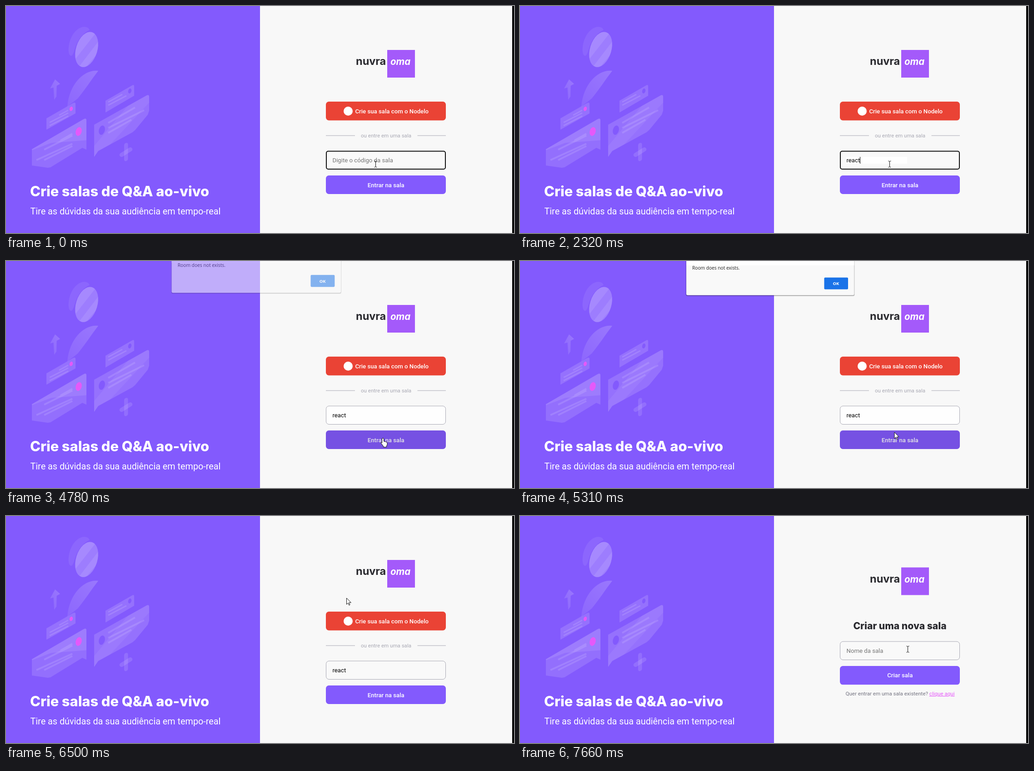
An HTML page that plays this animation: 1118x501 px, repeating every 8000 ms.

```html
<!DOCTYPE html>
<html lang="pt-BR">
<head>
<meta charset="utf-8">
<title>Salas de Q&amp;A</title>
<style>
  html, body { margin: 0; width: 100%; height: 100%; overflow: hidden; background: #f8f8f8; }
  svg { display: block; width: 100vw; height: 100vh; }
  text { font: 13.2px Roboto, sans-serif; white-space: pre; }
  .title { font: 800 30.8px Inter, sans-serif; fill: #fff; }
  .lead { font-size: 19.8px; fill: #fff; }
  .name { font: 700 23.5px Inter, sans-serif; fill: #29292e; }
  .tail { font: italic 700 20.5px Inter, sans-serif; fill: #fff; }
  .sub { font: 800 21.1px Inter, sans-serif; fill: #29292e; }
  .label { font-weight: 500; fill: #fff; }
  .small { font-size: 11.55px; fill: #a8a8b3; }
  .hint { fill: #757575; }
  .msg { font: 10.2px "Open Sans", sans-serif; fill: #222; }
  .ok { font: 700 9.5px "Open Sans", sans-serif; fill: #fff; }
  .mid { text-anchor: middle; }
  .lines { fill: none; stroke: #fff; stroke-opacity: .12; stroke-width: 4; }
</style>
</head>
<body>
<svg viewBox="0 0 1118 501" preserveAspectRatio="none">
  <defs>
    <clipPath id="oval"><ellipse cx="177.5" cy="96" rx="23.5" ry="40" transform="rotate(17 177.5 96)"/></clipPath>
    <clipPath id="cardL"><path d="M57 316 172 249q5-2 5 3v65l-9-4-70 43-6 1-35-5z"/></clipPath>
    <clipPath id="cardR"><path d="M194 262 310 197q5-2 5 3v31l-3 9-28 34-6 5-75 41-9 13z"/></clipPath>
    <linearGradient id="fade" x1="1" y1="0" x2="0" y2="1">
      <stop offset="0" stop-color="#fff" stop-opacity=".18"/>
      <stop offset="1" stop-color="#fff" stop-opacity=".08"/>
    </linearGradient>
    <g id="logo">
      <rect x="839" y="97" width="61" height="61" fill="#a45afa"/>
      <text class="name" x="770" y="130">nuvra</text>
      <text class="tail" x="846" y="130">oma</text>
    </g>
  </defs>

  <rect width="1118" height="501" fill="#f8f8f8"/>
  <rect width="559" height="501" fill="#835afd"/>

  <g fill="#fff">
    <path fill-opacity=".07" d="M184 53c-3-8-16-10-27-1-14 11-21 33-19 50 1 7 4 8 6 8 5-2 6-14 12-27 6-14 17-25 28-30z"/>
    <g clip-path="url(#oval)">
      <rect x="145" y="50" width="65" height="90" fill-opacity=".21"/>
      <path fill-opacity=".09" d="M145 50h60l-53 68h-7zM205 76v24l-33 40h-16z"/>
    </g>
    <path fill="url(#fade)" d="M203 143c-31-4-64 29-68 79 8-7 15-11 23-18 15-18 29-40 45-61z"/>
    <path fill="url(#fade)" d="M108 162 119 172 111.500 176 111 200 106 207 104.500 180 97 182z"/>
    <path fill-opacity=".14" d="M89 248 148 214q5-2 5 2v21l-64 36z"/>
    <path fill-opacity=".14" d="M219 209 278 175q4-2 4 2v21l-63 37z"/>
    <g clip-path="url(#cardL)">
      <rect x="50" y="240" width="130" height="120" fill-opacity=".13"/>
      <path fill-opacity=".09" d="M180 245v51l-80 6-45 17v-10z"/>
    </g>
    <g clip-path="url(#cardR)">
      <rect x="190" y="190" width="130" height="145" fill-opacity=".14"/>
      <path fill-opacity=".06" d="M270 218 320 190v18l-96 103-30 22v-24z"/>
    </g>
    <g fill-opacity=".12">
      <rect x="260" y="302" width="8.500" height="40" rx="4" transform="skewY(-15) translate(0 71)"/>
      <rect x="248" y="318" width="32" height="9" rx="4.500" transform="rotate(-32 264 322.500)"/>
    </g>
  </g>
  <g class="lines">
    <path d="M120 297 146 282M84 317 146 286M67 340 146 304M84 340 146 309"/>
    <path d="M225 258 284 224M225 269 304 230M225 280 276 251"/>
    <path stroke-width="3" d="M117 241 137 230M96 257 137 236M96 264 137 243M225 212 256 195M225 219 265 198"/>
  </g>
  <g fill="#e559f9">
    <ellipse cx="160" cy="277" rx="6.500" ry="10" transform="rotate(16 160 277)"/>
    <ellipse cx="143.500" cy="227" rx="3.500" ry="5" transform="rotate(16 143.500 227)"/>
    <ellipse cx="211" cy="274" rx="6.500" ry="10.500" fill="#835afd" transform="rotate(16 211 274)"/>
    <ellipse cx="272.500" cy="187.500" rx="3.500" ry="5.500" fill="#835afd" transform="rotate(16 272.500 187.500)"/>
  </g>
  <text class="title" x="53" y="420">Crie salas de Q&amp;A ao-vivo</text>
  <text class="lead" x="53.500" y="460">Tire as dúvidas da sua audiência em tempo-real</text>

  <g id="home">
    <use href="#logo"/>
    <rect x="704" y="211" width="264" height="41.500" rx="6.500" fill="#ea4335"/>
    <circle cx="753" cy="232" r="10" fill="#fff"/>
    <text class="label" x="768.500" y="237">Crie sua sala com o Nodelo</text>
    <rect id="redShade" x="704" y="211" width="264" height="41.500" rx="6.500"/>
    <path d="M704 286h64M905.500 286H968" stroke="#a8a8b3"/>
    <text class="small mid" x="836.500" y="290">ou entre em uma sala</text>
    <rect id="field" x="704.500" y="320" width="263" height="40.500" rx="6.500" stroke="#a8a8b3"/>
    <rect id="focus" x="705" y="320.500" width="262" height="39.500" rx="4" fill="none" stroke="#111" stroke-width="2"/>
    <rect id="patch" x="718" y="333" width="134" height="15" fill="#fff"/>
    <text id="hint" class="hint" x="718.500" y="345">Digite o código da sala</text>
    <text id="typed" x="718.500" y="345"></text>
    <path id="spell" fill="none" stroke="#e53935"/>
    <rect id="caret" y="333" width="1" height="15"/>
    <rect x="704" y="374" width="264" height="41" rx="6.500" fill="#835afd"/>
    <text class="label mid" x="836.300" y="399.500">Entrar na sala</text>
    <rect id="shade" x="704" y="374" width="264" height="41" rx="6.500"/>
  </g>

  <g id="create">
    <use href="#logo" y="16.500"/>
    <text class="sub mid" x="836" y="250">Criar uma nova sala</text>
    <rect x="704.500" y="277" width="263" height="40.500" rx="6.500" fill="#f9f9f9" stroke="#a8a8b3"/>
    <text class="hint" x="718.500" y="301.500">Nome da sala</text>
    <rect x="704" y="331" width="264" height="41.300" rx="6.500" fill="#835afd"/>
    <text class="label mid" x="836.300" y="356">Criar sala</text>
    <text class="small mid" x="836.500" y="396" style="fill:#737380">Quer entrar em uma sala existente? <tspan fill="#e559f9" text-decoration="underline">clique aqui</tspan></text>
  </g>

  <g id="dialog">
    <rect x="364.500" y="-20" width="372.500" height="98" rx="4" opacity=".08"/>
    <rect x="365.500" y="-20" width="370.500" height="97" rx="3.500" opacity=".28"/>
    <rect x="366" y="-20" width="369.500" height="95.500" rx="3" fill="#f9f9f9"/>
    <rect x="366" y="-20" width="369.500" height="29.500" fill="#fff"/>
    <text class="msg" x="379" y="19">Room does not exists.</text>
    <rect x="669.500" y="36.500" width="52.500" height="26" rx="2" fill="#1a73e8"/>
    <text class="ok mid" x="695.500" y="53">OK</text>
  </g>

  <rect x="1114" width="4" height="501"/>
  <path id="pointer" stroke="#111" stroke-linejoin="round"/>
</svg>
<script>
  const LOOP = 8000;
  const el = id => document.getElementById(id);
  const set = (id, name, value) => el(id).setAttribute(name, value);
  const show = (id, on) => set(id, "visibility", on ? "visible" : "hidden");
  const within = (t, a, b) => t >= a && t < b;
  // Last entry whose start time has been reached.
  const at = (steps, t) => steps.reduce((found, s) => t >= s[0] ? s : found);

  const shapes = {
    beam: "M-3-7q3 0 3 2v10q0 2-3 2M3-7q-3 0-3 2v10q0 2 3 2",
    arrow: "M0 0v14l3.3-3 2.2 5 2-1-2.2-4.8h4.6z",
    hand: "M-2 1.5q0-2 2-2t2 2v5l4.5 1q3 .7 3 3.2v3l-1.5 3v2.5h-7v-2l-5-6.5q-1-1.8.5-2.3t1.5 1.8z"
  };
  const moves = [
    [0, "beam", 813.5, 349], [3150, "beam", 810.5, 348.5], [3290, "beam", 810.5, 347],
    [3420, "beam", 810, 346], [3570, "beam", 810, 344.5], [3710, "beam", 811.5, 353.5],
    [3850, "hand", 821.5, 378], [3970, "hand", 826, 385], [4090, "hand", 829.5, 391.5],
    [5190, "arrow", 824, 378], [5320, "arrow", 795, 318], [5450, "arrow", 754, 232],
    [5570, "arrow", 712, 143], [5700, "arrow", 684, 84], [5820, "arrow", 668, 52],
    [5950, "arrow", 679, 47], [6100, "arrow", 682.5, 47.5], [6370, "arrow", 697, 79],
    [6500, "arrow", 749.5, 181], [6630, "hand", 795, 222], [6760, "hand", 824, 230],
    [6880, "hand", 839, 233], [7010, "hand", 847, 234], [7140, "hand", 850, 234],
    [7410, "arrow", 851, 238], [7530, "beam", 852, 268], [7660, "beam", 853.5, 294]
  ];
  // Start, letters typed, caret position.
  const typing = [[0, 0, 718], [540, 1, 722], [1380, 2, 729.5], [1780, 3, 736], [2320, 5, 748]];
  const press = [[0, 0], [3970, .05], [4090, .1], [6370, .05], [6500, 0]];
  const redPress = [[0, 0], [6630, .05], [6760, .1]];

  set("spell", "d", "M718.5 348" + "l2-2 2 2".repeat(7) + "l2-2");

  function draw(t) {
    const home = t < 7410;
    el("home").style.display = home ? "" : "none";
    el("create").style.display = home ? "none" : "";

    const [, count, x] = at(typing, t);
    el("typed").textContent = "react".slice(0, count);
    show("hint", t < 540);
    show("patch", within(t, 540, 4490));
    show("focus", t < 4490);
    show("spell", within(t, 3290, 4490));
    show("caret", within(t, 540, 1240) || within(t, 1380, 3000) || within(t, 3420, 4090));
    set("caret", "x", x);
    set("field", "fill", within(t, 4490, 6230) ? "#fefefe" : "#f9f9f9");
    set("field", "stroke-opacity", t < 4490 ? 0 : 1);
    set("shade", "opacity", at(press, t)[1]);
    set("redShade", "opacity", at(redPress, t)[1]);

    const entering = t < 4900;
    show("dialog", within(t, 4780, 6370));
    set("dialog", "opacity", entering ? .52 : 1);
    set("dialog", "transform", entering ? "translate(-4.4 -6) scale(1.008 1.01)" : "");

    const [, kind, px, py] = at(moves, t);
    set("pointer", "d", shapes[kind]);
    set("pointer", "fill", kind === "beam" ? "none" : "#fff");
    set("pointer", "transform", `translate(${px} ${py})`);
  }

  function tick() {
    draw(performance.now() % LOOP);
    requestAnimationFrame(tick);
  }
  tick();
</script>
</body>
</html>
```
